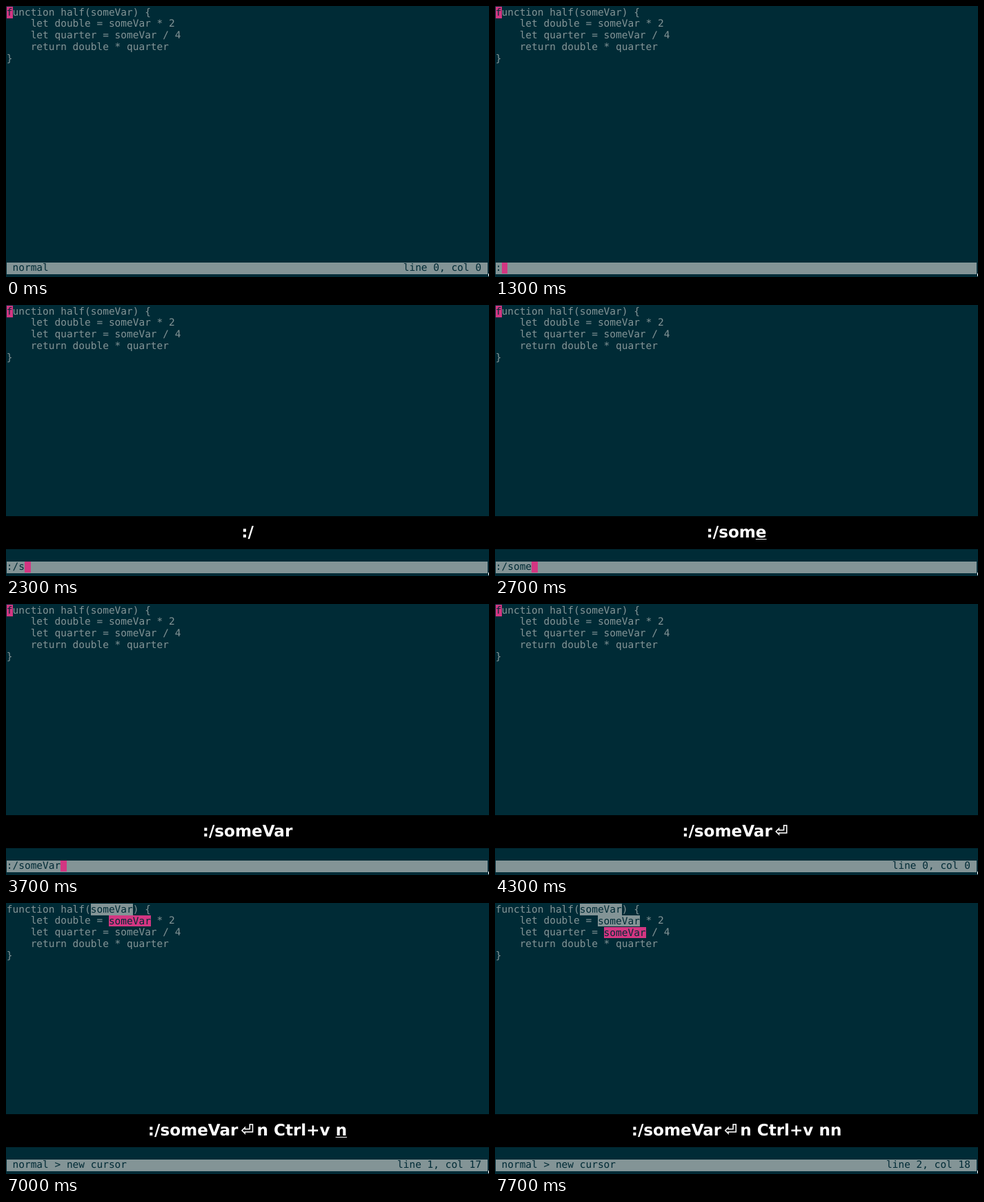
An HTML page that plays this animation: 700x394 px, repeating every 8 s.

```html
<!DOCTYPE html>
<html lang="en">
<head>
<meta charset="utf-8">
<title>Multiple cursors</title>
<style>
  html, body { margin: 0; width: 100%; height: 100%; overflow: hidden; background: #002b36; }
  body { position: relative; text-rendering: geometricPrecision; }
  pre, div { position: absolute; margin: 0; white-space: pre; }
  pre { left: .8px; font: 14.47px/16.95px "DejaVu Sans Mono", monospace; color: #839496; }
  #code { top: 1.5px; }
  #bar { top: 373.4px; width: 697.4px; height: 17px; background: #839496; color: #002b36; }
  mark { background: #839496; color: #002b36; padding-top: .5px; }
  .main { background: #d33682; }
  #keys { top: 307px; width: 700px; height: 48px; background: #000; color: #fff; text-align: center;
    font: bold 23.1px/49px "DejaVu Sans", sans-serif; }
  #keys i { display: inline-block; width: 27px; font-style: normal; }
  u { text-decoration: underline 1px; text-underline-offset: 1.5px; text-decoration-skip-ink: none; }
  #corner { left: 699px; top: 389px; width: 1px; height: 4px; background: #fff; }
</style>
</head>
<body>
<pre id="code"></pre>
<div id="keys"></div>
<pre id="bar"></pre>
<div id="corner"></div>
<script>
const LOOP = 8000, RECENT = 200, COLS = 80;
const lines = [
  'function half(someVar) {',
  '    let double = someVar * 2',
  '    let quarter = someVar / 4',
  '    return double * quarter',
  '}'
];
// [editor reacts, key caster shows it, key]
const presses = [
  [1300, 1400, ':'], [1800, 1900, '/'], [2300, 2400, 's'], [2400, 2500, 'o'],
  [2500, 2600, 'm'], [2600, 2700, 'e'], [2800, 2900, 'V'], [3200, 3300, 'a'],
  [3400, 3500, 'r'], [3800, 3900, '⏎'], [5100, 5200, 'n'], [6600, 6600, ' Ctrl+v'],
  [7000, 7000, ' n'], [7400, 7500, 'n']
];
const ENTER = 3800, SPLIT = 6600, jumps = [5100, 7000, 7400];
const $ = id => document.getElementById(id);
const mark = (text, main) => `<mark class="${main ? 'main' : ''}">${text}</mark>`;

function codeHtml(row) {
  return lines.map((line, i) => {
    if (row < 0) return i ? line : mark(line[0], true) + line.slice(1);
    return i > row ? line : line.replace('someVar', word => mark(word, i === row));
  }).join('\n');
}

function barHtml(t, row) {
  const typed = presses.filter(p => p[0] <= t).map(p => p[2]).join('');
  if (typed && t < ENTER) return typed + mark(' ', true);
  const mode = !typed ? ' normal' : t >= SPLIT ? ' normal > new cursor' : '';
  const col = row < 0 ? 0 : lines[row].indexOf('someVar');
  const place = `line ${Math.max(row, 0)}, col ${col}`;
  return mode + place.padStart(COLS - 1 - mode.length);
}

function keysHtml(t) {
  const shown = presses.filter(p => p[1] <= t);
  return shown.map(([, at, key], i) => {
    const fresh = i === shown.length - 1 && t < at + RECENT;
    const text = fresh ? key.replace(/\S+/, '<u>$&</u>') : key;
    return key === '⏎' ? `<i>${text}</i>` : text;
  }).join('');
}

function put(id, html) {
  const el = $(id);
  if (el.last !== html) el.innerHTML = el.last = html;
}

function draw(now) {
  const t = now % LOOP;
  const row = jumps.filter(at => at <= t).length - 1;
  const keys = keysHtml(t);
  put('code', codeHtml(row));
  put('bar', barHtml(t, row));
  put('keys', keys);
  $('keys').hidden = !keys;
  requestAnimationFrame(draw);
}
draw(0);
</script>
</body>
</html>
```
